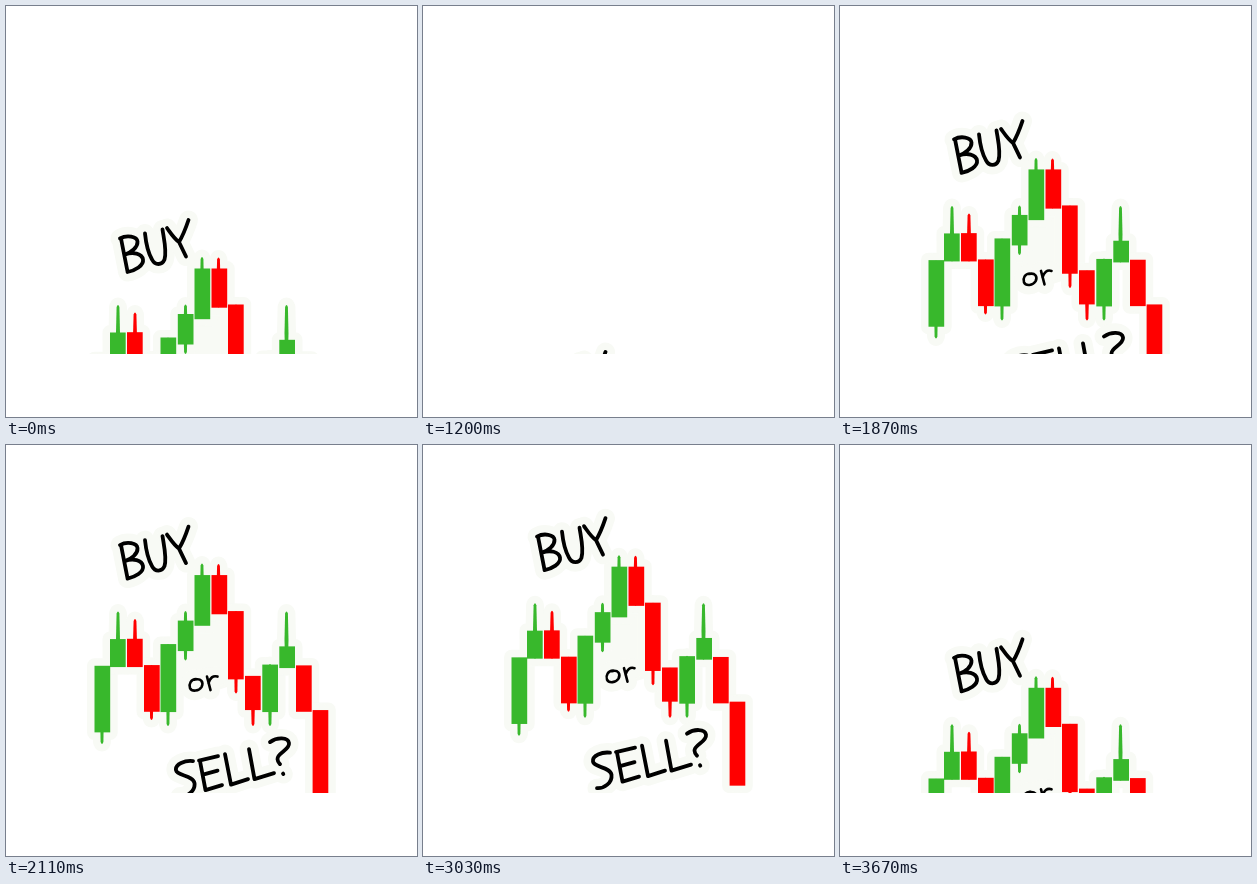
An HTML page for the animation above (3730 ms loop, 411 px wide and 411 px high).

```html
<!DOCTYPE html>
<html lang="en">
<head>
<meta charset="utf-8">
<title>Buy or sell?</title>
<style>
html, body { margin: 0; width: 100%; height: 100%; overflow: hidden; background: #fff; }
svg { display: block; width: 100vw; height: 100vh; }
.ink path { fill: none; stroke: #000; stroke-linecap: round; stroke-linejoin: round; }
.halo * { fill: #f8faf5; stroke: #f8faf5; stroke-width: 15; stroke-linecap: round; stroke-linejoin: round; }
.halo .line { fill: none; stroke-width: 19; }
</style>
</head>
<body>
<svg viewBox="0 0 411 411" role="img" aria-label="BUY or SELL?">
  <clipPath id="window"><rect width="411" height="348"/></clipPath>
  <g clip-path="url(#window)"><g id="sticker"></g></g>
</svg>
<script>
const GREEN = '#38b82c', RED = '#ff0000';

// colour, left, body top, body bottom, wick x, wick top, wick bottom
const candles = [
  [GREEN, 88.5, 209.7, 276.3, 96, 210, 288],
  [GREEN, 104, 183, 211, 112, 155.5, 211],
  [RED, 121, 182.7, 211, 129, 163, 211],
  [RED, 138, 209, 255.7, 145.5, 209, 264],
  [GREEN, 154.5, 188, 256, 162, 188, 270],
  [GREEN, 171.8, 164.5, 195, 179.5, 155, 204.5],
  [GREEN, 188.5, 119, 169.7, 196, 107.5, 169],
  [RED, 205.5, 119, 158.2, 212.5, 108, 158],
  [RED, 222, 155, 223.3, 230, 155, 237.5],
  [RED, 239, 219.8, 254, 247, 220, 270],
  [GREEN, 256.3, 208.5, 256, 264, 208, 270],
  [GREEN, 273.3, 190.3, 212, 280.5, 155.5, 212],
  [RED, 290, 209.3, 255.7, 298, 210, 255],
  [RED, 306.6, 254, 338, 314, 255, 337]
];

const letters = [
  // BUY
  [3.8, 'M115 89L121.5 122M114 89C121 85 131 87 131.5 92C132 98 125 103 119 105C127 102 136 104 137 110C138 116 129 121 121.5 122.5'],
  [3.8, 'M139 84C140 94 142 103 146 110C149 116 156 116 158.5 110C161 102 158 90 156.5 80'],
  [3.8, 'M161 78.5C165 84 168 89 173 92.5M182.5 70.5C180 78 177 86 173 92.5L180 107'],
  // or
  [2.6, 'M190 223C185 223 182.5 228 184 232C186 236 193 235 195.5 231C198 226 195 222 189 223.5'],
  [2.6, 'M201 220.5L204.5 234M202.5 227C204 222 207 219 211.5 220.5'],
  // SELL?
  [3.8, 'M187 305C179 304 169 308 170 314C171 320 187 319 188.5 327C189.5 335 181 341 174 340.5'],
  [3.8, 'M194 305L199.5 334M193 304.5L212 300M197 318.5L211.5 314.5M199.5 334L216 329'],
  [3.8, 'M219 298L225 328.5L242 323'],
  [3.8, 'M243 293L248.5 323L268 317'],
  [3.8, 'M264 286C271 281 282 281 283 287C284 294 271 297 271.5 303C271.7 306 273 307 274 308M277 317.5L277.3 318']
];

const bodies = candles.map(([c, x, top, bottom]) =>
  `<rect x="${x}" y="${top}" width="15.7" height="${bottom - top}" fill="${c}"/>`).join('');
const wicks = candles.map(([c, , , , x, top, bottom]) => {
  const mid = (top + bottom) / 2;
  return `<path d="M${x - 2} ${mid}L${x - 1.4} ${top + 2}Q${x} ${top - 2} ${x + 1.4} ${top + 2}` +
    `L${x + 2} ${mid}L${x + 1.4} ${bottom - 2}Q${x} ${bottom + 2} ${x - 1.4} ${bottom - 2}Z" fill="${c}"/>`;
}).join('');
const ink = letters.map(([w, d]) => `<path class="line" stroke-width="${w}" d="${d}"/>`).join('');
const middle = '<path d="M180 195L196 165L222 158L230 220L200 230L180 230Z"/>';

const sticker = document.getElementById('sticker');
sticker.innerHTML = `<g class="halo">${middle}${bodies}${wicks}${ink}</g>${wicks}${bodies}<g class="ink">${ink}</g>`;

// The sticker bobs on a cosine; the pace of its steps varies.
const LOOP = 3730, HALF = 22.8, REACH = 287;
const RISE_AT = 1200, FALL_AT = 3030, GONE_AT = 430;
const run = (count, ms) => Array(count).fill(ms);
const rise = [...run(3, 30), ...run(3, 40), ...run(2, 50), ...run(6, 60), ...run(6, 80)];
const fall = [...run(5, 80), ...run(6, 60), ...run(3, 50), ...run(4, 40), ...run(2, 30)];

function stepAt(steps, t) {
  let n = 0;
  while (n < steps.length && t >= steps[n]) t -= steps[n++];
  return n;
}

function drop(t) {
  const rising = t >= RISE_AT && t < FALL_AT;
  const phase = rising
    ? Math.max(0, 19.87 - stepAt(rise, t - RISE_AT))
    : 1.4 + stepAt(fall, (t - FALL_AT + LOOP) % LOOP);
  return REACH / 2 * (1 - Math.cos(Math.PI * phase / HALF));
}

function draw(now) {
  const t = now % LOOP;
  const hidden = t >= GONE_AT && t < RISE_AT;
  sticker.setAttribute('visibility', hidden ? 'hidden' : 'visible');
  sticker.setAttribute('transform', `translate(0 ${drop(t).toFixed(2)})`);
}

const start = performance.now();
function tick() {
  draw(performance.now() - start);
  requestAnimationFrame(tick);
}
draw(0);
requestAnimationFrame(tick);
</script>
</body>
</html>
```
